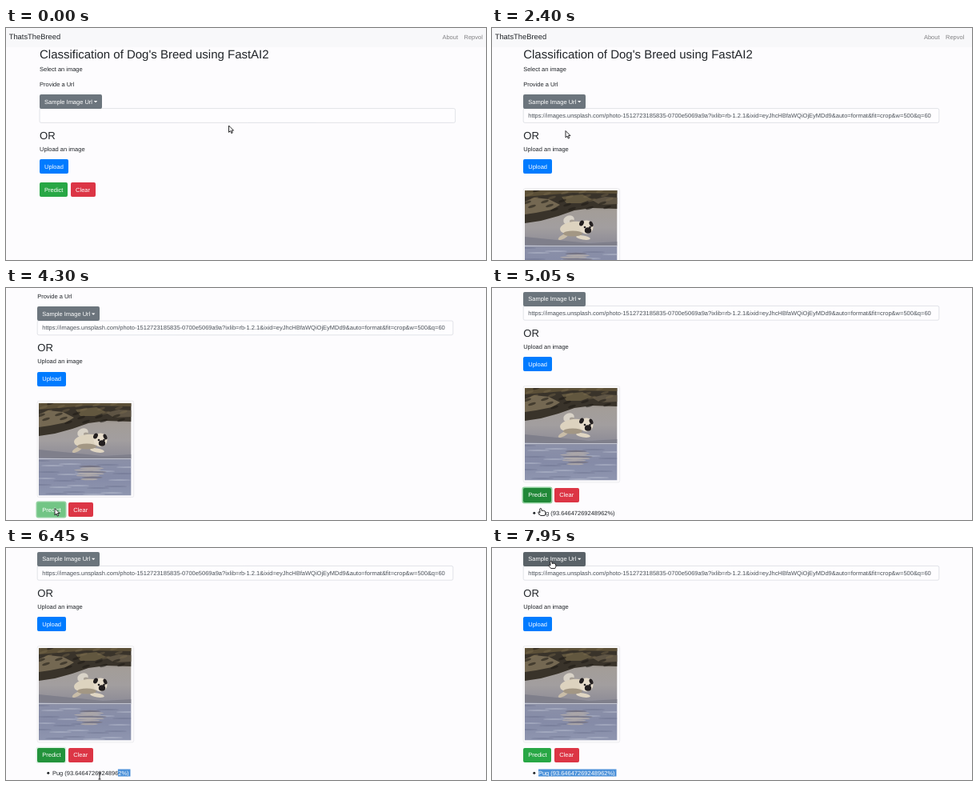
Write an HTML page with a canvas that moves like this. It is 600 px wide and 290 px high and loops after 8000 ms.

```html
<!DOCTYPE html>
<html lang="en">
<head>
<meta charset="utf-8">
<title>Classification of Dog's Breed</title>
<style>
html, body { margin: 0; width: 100%; height: 100%; overflow: hidden; background: #fdfcfe; }
canvas { display: block; width: 600px; height: 290px; }
</style>
</head>
<body>
<canvas id="stage" width="600" height="290"></canvas>
<script>
const ctx = document.getElementById('stage').getContext('2d');
const LOOP = 8000, EM = 7.49, PAGE = '#fdfcfe', INK = '#212529';
const GREY = [108, 117, 125], GREY_HOVER = [90, 98, 104];
const GREEN = [40, 167, 69], GREEN_HOVER = [33, 136, 56], GREEN_OFF = [114, 197, 133];
const URL_TEXT = 'https://images.unsplash.com/photo-1512723185835-0700e5069a9a?ixlib=rb-1.2.1&ixid=eyJhcHBfaWQiOjEyMDd9&auto=format&fit=crop&w=500&q=60';
const RESULT = 'Pug (93.64647269248962%)';

// time, x, y, pointer shape from that time on
const POINTER = [
  [0, 278.5, 122, 'arrow'], [50, 278.5, 122, 'arrow'], [180, 318, 70, 'arrow'],
  [290, 306, 33, 'beam'], [500, 62, 34, 'beam'], [560, 60, 60, 'arrow'], [650, 70, 138, 'arrow'],
  [1000, 70, 138, 'arrow'], [1200, 84, 96, 'hand'], [1400, 84, 92, 'hand'],
  [1800, 88, 130, 'hand'], [1850, 62, 196, 'arrow'], [1950, 92, 128.5, 'hand'],
  [2300, 92, 128.5, 'arrow'], [2450, 92, 128.5, 'arrow'], [3100, 95, 178, 'arrow'],
  [3200, 95, 178, 'arrow'], [3650, 61, 275.5, 'hand'], [3900, 61, 275.5, 'arrow'],
  [4850, 61, 275.5, 'hand'], [5700, 61, 275.5, 'arrow'], [5800, 80, 278, 'beam'],
  [6200, 155, 283, 'beam'], [6350, 155, 283, 'beam'], [6450, 117, 285, 'beam'],
  [6600, 57, 283, 'beam'], [6850, 57, 283, 'arrow'], [7200, 85, 190, 'arrow'],
  [7600, 78, 24, 'hand'], [7800, 74, 16.5, 'hand'], [8000, 74, 16.5, 'hand']
];

const clamp = v => Math.max(0, Math.min(1, v));
const ramp = (t, from, to) => clamp((t - from) / (to - from));
const smooth = v => v * v * (3 - 2 * v);
const mix = (a, b, k) => a + (b - a) * k;
const blend = (a, b, k) => `rgb(${a.map((v, i) => Math.round(mix(v, b[i], k)))})`;
let scroll = 0;

// nearest page coordinate that lands on a whole screen pixel
const snapY = y => Math.round(y - scroll) + scroll;

function text(str, x, middle, size = EM, color = INK, align = 'left') {
  ctx.font = `${size}px "Liberation Sans", Arial, sans-serif`;
  ctx.textAlign = align;
  ctx.fillStyle = color;
  ctx.fillText(str, x, middle + size * 0.3465);
}

function box(x, y, w, h, r, fill, stroke) {
  ctx.beginPath();
  ctx.roundRect(x, y, w, h, r);
  if (fill) { ctx.fillStyle = fill; ctx.fill(); }
  if (stroke) { ctx.strokeStyle = stroke; ctx.lineWidth = 0.6; ctx.stroke(); }
}

function poly(points, fill) {
  ctx.beginPath();
  points.forEach(p => ctx.lineTo(...p));
  ctx.closePath();
  ctx.fillStyle = fill;
  ctx.fill();
}

function oval(x, y, rx, ry, fill, turn = 0) {
  ctx.beginPath();
  ctx.ellipse(x, y, rx, ry, turn, 0, 7);
  ctx.fillStyle = fill;
  ctx.fill();
}

function button(label, x, y, w, fill, ring = 0) {
  const left = Math.round(x), width = Math.round(x + w) - left, top = snapY(y);
  if (ring > 0) box(left - 1.5, top - 1.5, width + 3, 21, 3, `rgba(40,167,69,${ring * 0.5})`);
  box(left, top, width, 18, 1.9, fill);
  text(label, x + 6.1, y + 8.9, EM, '#fff');
}

function dog() {
  oval(55, 37, 7, 5.5, '#d9d3c8', -0.4);
  oval(59, 39, 3, 2.4, '#a8a095');
  oval(61, 47, 17, 8, '#ddd3bf', -0.1);
  oval(48, 58, 7, 2.6, '#c9bda8', -0.5);
  oval(73, 59, 9, 2.6, '#e0d6c3', 0.15);
  oval(60, 54, 12, 3.5, '#a39784');
  oval(77, 46, 8.5, 8.5, '#e6dccb');
  oval(71, 41, 2.6, 3.6, '#231f20', 0.5);
  oval(83, 42, 2.2, 3.6, '#231f20', -0.4);
  oval(79, 50, 4.2, 3.8, '#231f20');
  oval(75, 46, 1.3, 1.2, '#231f20');
  oval(81.5, 46, 1.3, 1.2, '#231f20');
}

function photo(x, y) {
  box(x, y, 120.5, 120.5, 2, '#fbfafc', '#e2e3e6');
  ctx.save();
  ctx.translate(Math.round(x + 2.2), snapY(y + 2.4));
  ctx.beginPath();
  ctx.rect(0, 0, 115.3, 115.3);
  ctx.clip();
  const ground = ctx.createLinearGradient(0, 0, 0, 116);
  [[0, '#6d6455'], [0.22, '#a39d98'], [0.4, '#a29e9f'], [0.55, '#918f98'],
   [0.62, '#8b90a8'], [0.8, '#858ba7'], [1, '#8f96b0']]
    .forEach(([at, color]) => ground.addColorStop(at, color));
  ctx.fillStyle = ground;
  ctx.fillRect(0, 0, 116, 116);

  // rocky bank with lit faces
  poly([[0, 0], [116, 0], [116, 23], [84, 22], [62, 25], [42, 32], [20, 38], [0, 41]], '#39332a');
  poly([[0, 14], [12, 9], [30, 11], [44, 18], [34, 24], [14, 28], [0, 30]], '#746852');
  poly([[46, 8], [72, 5], [84, 11], [70, 16], [52, 16]], '#62573f');
  poly([[84, 12], [100, 8], [116, 9], [116, 17], [94, 18]], '#5e5444');
  poly([[0, 0], [116, 0], [116, 4], [60, 3], [24, 6], [0, 8]], '#5b4f37');
  for (let i = 0; i < 26; i++) {
    oval((i * 47) % 116, (i * 13) % 25, 5, 1.5, i % 2 ? 'rgba(30,27,21,.55)' : 'rgba(128,113,80,.35)', -0.3);
  }

  // wet sand, shoreline and ripples
  poly([[0, 58], [40, 62], [80, 66], [116, 64], [116, 69], [60, 70], [0, 68]], '#7f7f8b');
  ctx.fillStyle = '#c3c6d2';
  ctx.fillRect(0, 69, 116, 1);
  for (let i = 0; i < 24; i++) {
    oval((i * 37) % 116, 72 + (i * 17) % 43, 14, 0.7, i % 2 ? 'rgba(200,205,220,.5)' : 'rgba(92,99,128,.4)');
  }
  for (let i = 0; i < 8; i++) {
    oval(64 + 3 * Math.sin(i * 2.3), 79 + i * 2.3, 19 - Math.abs(i - 3) * 2, 1.2, i % 3 ? 'rgba(190,180,170,.7)' : 'rgba(112,108,118,.6)');
  }
  dog();
  ctx.restore();
}

function menu(x, y) {
  box(x, y, 75, 82, 1.9, '#fff', '#cfcfd2');
  ['Husky', 'Pug', 'Beagle', 'Boxer', 'Poodle']
    .forEach((name, i) => text(name, x + 11.5, y + 11 + i * 15));
}

function result(x, y, t) {
  oval(x + 13.6, y + 0.3, 1.5, 1.5, INK);
  const left = x + 18.7, right = x + 116.5;
  text(RESULT, left, y);
  if (t < 6380) return;
  const edge = t < 6450
    ? mix(right, x + 101, ramp(t, 6380, 6450))
    : mix(x + 101, left, ramp(t, 6450, 6620));
  ctx.save();
  ctx.beginPath();
  ctx.rect(edge, y - 4.6, right - edge, 9.2);
  ctx.clip();
  ctx.fillStyle = '#4a90d9';
  ctx.fillRect(edge, y - 5, right - edge, 10);
  text(RESULT, left, y, EM, '#fff');
  ctx.restore();
}

function page(t) {
  const loaded = t >= 2300;
  const x = loaded ? 39.2 : 42;
  scroll = 59.6 * smooth(ramp(t, 2450, 3050)) + 18.6 * smooth(ramp(t, 4850, 5050));
  ctx.save();
  ctx.translate(0, -scroll);

  ctx.fillStyle = '#f8f8fa';
  ctx.fillRect(0, 0, 600, 24);
  text('ThatsTheBreed', 3.7, 11, 9.36);
  const navRight = loaded ? 590.3 : 595.8;
  text('Repvol', navRight, 11, EM, '#808083', 'right');
  text('About', navRight - 30.8, 11, EM, '#808083', 'right');

  text("Classification of Dog's Breed using FastAI2", x, 33, 14.98);
  text('Select an image', x, 51.2);
  text('Provide a Url', x, 70.1);

  const hover = ramp(t, 1150, 1300) * (1 - ramp(t, 1600, 1750)) + ramp(t, 7550, 7700);
  const open = t >= 1400 && t < 2300;
  if (open) box(x - 1.5, 81.5, 80.8, 21, 3, 'rgba(108,117,125,.5)');
  box(x, 100.6, 519.6, 17.8, 1.9, '#fefdff', '#ced2d8');
  if (loaded) text(URL_TEXT, x + 6.1, 109.5, EM, '#495057');
  button('Sample Image Url', x, 83.1, 77.8, blend(GREY, GREY_HOVER, hover));
  poly([[x + 67.8, 91], [x + 72.2, 91], [x + 70, 93.3]], '#fff');

  text('OR', x, 134.2, 13.1);
  text('Upload an image', x, 151.4);
  button('Upload', x, 164.3, 35.8, '#007bff');

  const actionY = loaded ? 327.9 : 193.3;
  if (loaded) photo(x, 200.7);
  const off = ramp(t, 3900, 4050) * (1 - ramp(t, 4800, 4950));
  const over = ramp(t, 3600, 3750) * (1 - ramp(t, 6400, 6550));
  const ring = ramp(t, 3750, 3900) * (1 - ramp(t, 6340, 6490));
  const active = GREEN.map((v, i) => mix(v, GREEN_HOVER[i], over));
  button('Predict', x, actionY, 35.1, blend(active, GREEN_OFF, off), ring);
  button('Clear', x + 39, actionY, 30.5, '#dc3545');
  if (t >= 4850) result(x, 359.2, t);
  if (open) menu(x, 101.8);
  ctx.restore();
}

const SHAPES = {
  arrow: 'M0 0V8.4L2 6.6L3.3 9.6L4.7 9L3.4 6.1H6Z',
  hand: 'M-1.3 .5Q0-.8.8.5L1.2 3Q3.2 2 5.4 3.5L6 6.4L4.8 9H-.4L-3.4 5.2Q-2.7 4-1 5.4Z',
  beam: 'M-1.5-4H1.5M0-4V4M-1.5 4H1.5'
};

function pointer(t) {
  const next = POINTER.findIndex(k => k[0] > t);
  const a = POINTER[next - 1], b = POINTER[next];
  const k = smooth(ramp(t, a[0], b[0]));
  const shape = new Path2D(SHAPES[a[3]]);
  ctx.save();
  ctx.translate(mix(a[1], b[1], k), mix(a[2], b[2], k));
  ctx.lineWidth = 0.9;
  ctx.strokeStyle = '#151517';
  if (a[3] !== 'beam') { ctx.fillStyle = '#fff'; ctx.fill(shape); }
  ctx.stroke(shape);
  ctx.restore();
}

function draw(now) {
  const t = now % LOOP;
  ctx.fillStyle = PAGE;
  ctx.fillRect(0, 0, 600, 290);
  page(t);
  pointer(t);
}

ctx.textRendering = 'geometricPrecision';
const start = performance.now();
function tick() {
  draw(Math.max(0, performance.now() - start));
  requestAnimationFrame(tick);
}
tick();
</script>
</body>
</html>
```
